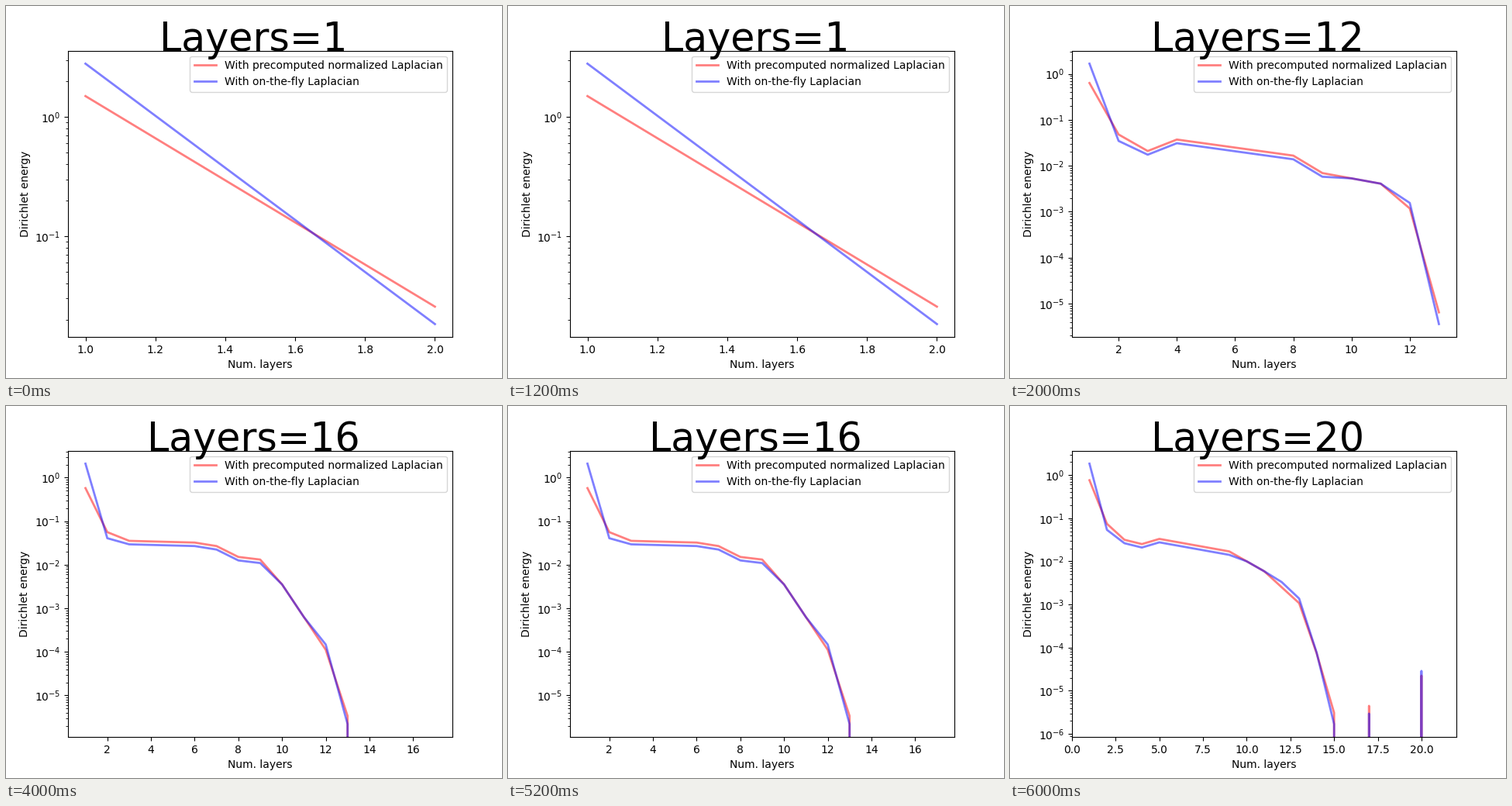
Write a matplotlib script that moves like this. It is 640 px wide and 480 px high and loops after 8000 ms.

```python
import numpy as np
import matplotlib.pyplot as plt
from matplotlib.animation import FuncAnimation

# Per run: layer count, corners of the precomputed curve as (layer, log10 energy),
# first and last log10 energy of the on-the-fly curve.
RUNS = [
    (1, [(1, 0.175), (2, -1.591)], (0.447, -1.737)),
    (12, [(1, -0.2), (2, -1.32), (3, -1.68), (4, -1.43), (8, -1.78),
          (9, -2.16), (11, -2.39), (12, -2.93), (13, -5.19)], (0.221, -5.445)),
    (16, [(1, -0.24), (2, -1.25), (3, -1.45), (6, -1.49), (7, -1.57), (8, -1.82),
          (9, -1.88), (10, -2.45), (12, -3.95), (13, -5.47)], (0.322, -5.657)),
    (20, [(1, -0.12), (2, -1.13), (3, -1.5), (4, -1.6), (5, -1.48), (9, -1.77),
          (11, -2.23), (13, -2.97), (14, -4.13), (15, -5.51)], (0.264, -5.772)),
]
# Late revivals in the deepest run: layer -> (precomputed, on the fly)
REVIVALS = {17: (-5.35, -5.53), 20: (-4.65, -4.54)}

fig, ax = plt.subplots(figsize=(6.4, 4.8), dpi=100)
title = fig.text(0.499, 0.88, "", fontsize=36.5, ha="center", va="baseline")


def curves(layers, corners, ends):
    """Return layer numbers and both energies, which vanish after the last corner."""
    x = np.arange(1, layers + 2)
    corner_x, corner_y = zip(*corners)
    last = corner_x[-1]
    precomputed = np.interp(x, corner_x, corner_y, right=-np.inf)

    # The second curve runs just below the first and crosses it before the collapse.
    gap = np.interp(x, [2, 3, 9, 10, 11, 12], [-0.14, -0.08, -0.08, 0, 0, 0.12])
    collapse = np.clip((x - 12) / max(last - 12, 1), 0, 1)
    on_the_fly = precomputed + gap - 0.35 * collapse ** 3
    on_the_fly[[0, last - 1]] = ends

    for layer, values in REVIVALS.items():
        if last < layer <= layers and layers == RUNS[-1][0]:
            precomputed[layer - 1], on_the_fly[layer - 1] = values
    return x, 10.0 ** precomputed, 10.0 ** on_the_fly


def draw(i):
    x, precomputed, on_the_fly = curves(*RUNS[i])
    ax.clear()
    style = dict(alpha=0.5, linewidth=2)
    ax.semilogy(x, precomputed, "red", label="With precomputed normalized Laplacian", **style)
    ax.semilogy(x, on_the_fly, "blue", label="With on-the-fly Laplacian", **style)
    ax.set_xlabel("Num. layers")
    ax.set_ylabel("Dirichlet energy")
    ax.legend(loc="upper right")
    title.set_text(f"Layers={RUNS[i][0]}")


anim = FuncAnimation(fig, draw, frames=len(RUNS), init_func=lambda: None,
                     interval=2000, repeat=True, repeat_delay=0)
plt.show()
```
